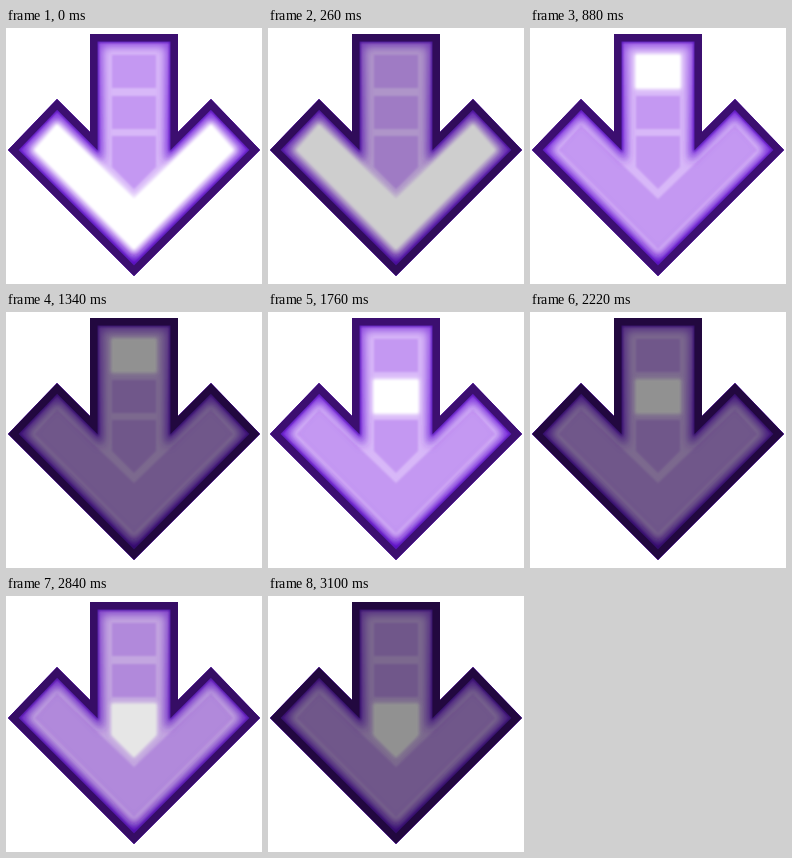
Write an HTML page that moves like this. It is 256 px wide and 256 px high and loops after 3.52 s.

```html
<!DOCTYPE html>
<html lang="en">
<head>
<meta charset="utf-8">
<title>Download arrow</title>
<style>
  html, body { margin: 0; width: 100%; height: 100%; overflow: hidden; background: #fff; }
  svg { display: block; width: 100vw; height: 100vh; }

  .lamp { opacity: 0; animation: light 3520ms step-end infinite; animation-delay: calc(var(--turn) * 880ms - 3520ms); }
  .shade { opacity: 0; animation: dim 880ms infinite; }

  @keyframes light {
    0% { opacity: 1; }
    25%, 100% { opacity: 0; }
  }
  /* bright for 120 ms, nine small drops until 460 ms, then dark */
  @keyframes dim {
    0% { opacity: 0; animation-timing-function: step-end; }
    13.6364% { opacity: 0; animation-timing-function: steps(8, jump-both); }
    52.2727%, 100% { opacity: .43; }
  }
</style>
</head>
<body>
<svg viewBox="0 0 256 256">
  <defs>
    <path id="arrow" d="M84 6H172V104L205 71L254 122L128 248L2 122L51 71L84 104Z"/>
    <path id="chevron" d="M51 97L128 171L205 97L227 122L128 221L29 122Z"/>
    <path id="top" d="M106 27H150V60H106Z"/>
    <path id="middle" d="M106 68H150V101H106Z"/>
    <path id="tip" d="M106 108H150V139L128 161L106 139Z"/>
    <clipPath id="inside"><use href="#arrow"/></clipPath>
    <filter id="soft1" x="-20%" y="-20%" width="140%" height="140%"><feGaussianBlur stdDeviation=".8"/></filter>
    <filter id="soft3" x="-20%" y="-20%" width="140%" height="140%"><feGaussianBlur stdDeviation="2.6"/></filter>
    <filter id="soft5" x="-20%" y="-20%" width="140%" height="140%"><feGaussianBlur stdDeviation="4.5"/></filter>
    <linearGradient id="rim" gradientUnits="userSpaceOnUse" x1="0" y1="6" x2="0" y2="248">
      <stop offset="0" stop-color="#9250e0"/>
      <stop offset=".4" stop-color="#7a2fdc"/>
      <stop offset="1" stop-color="#5a08c8"/>
    </linearGradient>
  </defs>

  <g clip-path="url(#inside)">
    <use href="#arrow" fill="#d8b8f8"/>
    <g fill="#c498f2" filter="url(#soft1)">
      <use href="#chevron"/>
      <use href="#top"/>
      <use href="#middle"/>
      <use href="#tip"/>
    </g>
    <use href="#arrow" fill="none" stroke="url(#rim)" stroke-width="25" filter="url(#soft5)"/>
    <use href="#arrow" fill="none" stroke="#5512b4" stroke-width="17" filter="url(#soft1)"/>

    <g fill="#fff" stroke="#fff" stroke-linejoin="round">
      <g class="lamp" style="--turn:0">
        <use href="#chevron" stroke-width="5" opacity=".75" filter="url(#soft3)"/>
        <use href="#chevron" stroke-width="1" filter="url(#soft1)"/>
      </g>
      <g class="lamp" style="--turn:1">
        <use href="#top" stroke-width="3" opacity=".7" filter="url(#soft3)"/>
        <use href="#top" stroke-width="1" filter="url(#soft1)"/>
      </g>
      <g class="lamp" style="--turn:2">
        <use href="#middle" stroke-width="3" opacity=".7" filter="url(#soft3)"/>
        <use href="#middle" stroke-width="1" filter="url(#soft1)"/>
      </g>
      <g class="lamp" style="--turn:3">
        <use href="#tip" stroke-width="3" opacity=".7" filter="url(#soft3)"/>
        <use href="#tip" stroke-width="1" filter="url(#soft1)"/>
      </g>
    </g>

    <use href="#arrow" fill="none" stroke="#3c0f70" stroke-width="15"/>
    <use class="shade" href="#arrow"/>
  </g>
</svg>
</body>
</html>
```
